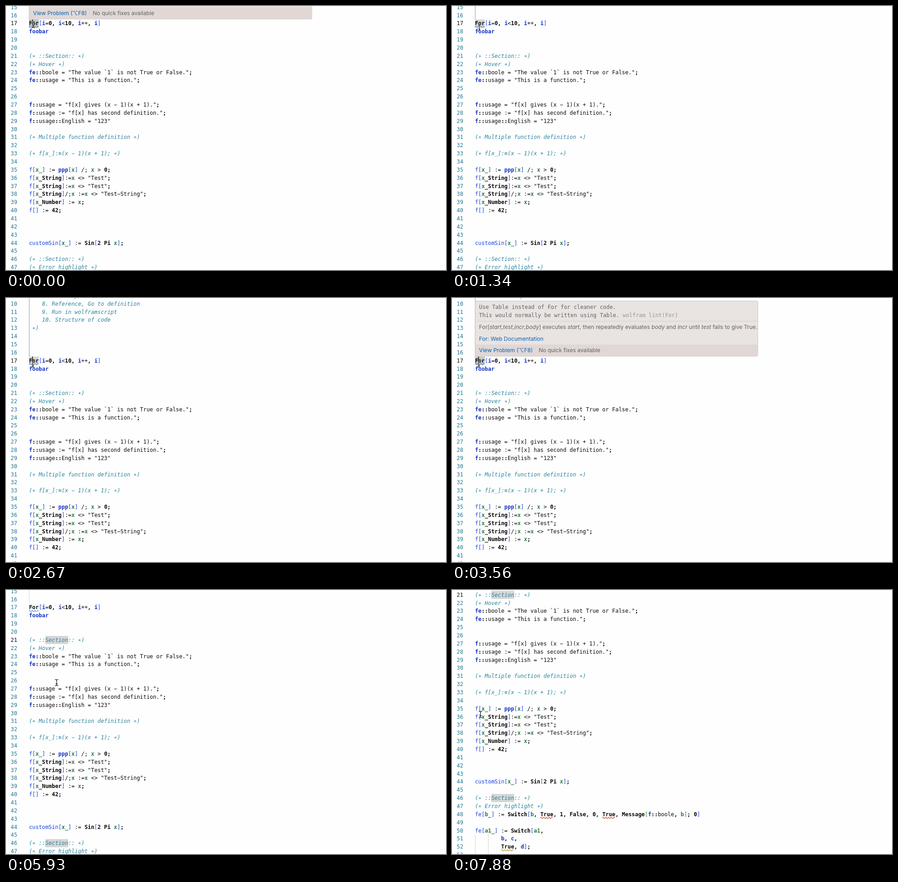
An HTML page that plays this animation: 965x580 px, repeating every 8000 ms.

```html
<!DOCTYPE html>
<html lang="en">
<head>
<meta charset="utf-8">
<title>Editor hover</title>
<style>
html, body { margin: 0; width: 100%; height: 100%; overflow: hidden; background: #fefefe; }
svg { display: block; }
text { white-space: pre; font: 12px "DejaVu Sans Mono", monospace; }
.num { fill: #237893; }
.num.on { fill: #0a0a0a; }
.K, .B, .G, .C { font-weight: bold; }
.K, .k { fill: #0a0a0a; }
.B { fill: #1433c4; }
.b { fill: #1a40e0; }
.G { fill: #277a40; }
.g { fill: #319331; }
.c, .C { fill: #2a84a0; font-style: italic; }
.tip text { fill: #616161; }
.tip .ui { font: 12.2px Inter, "Open Sans", sans-serif; }
.tip .dim { fill: #969696; }
.tip .link { fill: #0b62b0; }
.i { font-style: italic; }
</style>
</head>
<body>
<svg id="stage" width="965" height="580" xmlns="http://www.w3.org/2000/svg">
  <g transform="scale(.992)">
    <g id="page">
      <g id="marks"></g>
      <g id="code"></g>
      <rect id="caret" width="1.8" height="18" fill="#222"/>
      <g id="tip" class="tip" transform="translate(0 -100)">
        <rect x="51.4" y="6.5" width="624.8" height="122.6" rx="2" fill="#e9e4e2" stroke="#c9c6c5"/>
        <rect x="51.9" y="103" width="623.8" height="25.6" fill="#e1d8d6"/>
        <path d="M51.9 51.5h623.8" stroke="#d3cfcd"/>
        <text x="59.8" y="24.4">Use Table instead of For for cleaner code.</text>
        <text x="59.8" y="42.3">This would normally be written using Table. <tspan class="dim">wolfram lint(For)</tspan></text>
        <text class="ui" x="59.8" y="69">For[<tspan class="i">start</tspan>,<tspan class="i">test</tspan>,<tspan class="i">incr</tspan>,<tspan class="i">body</tspan>] executes <tspan class="i">start</tspan>, then repeatedly evaluates <tspan class="i">body</tspan> and <tspan class="i">incr</tspan> until <tspan class="i">test</tspan> fails to give True.</text>
        <text class="ui link i" x="59.8" y="95">For: Web Documentation</text>
        <text class="ui link" x="59.8" y="120">View Problem (⌥F8)</text>
        <text class="ui" x="191.8" y="120">No quick fixes available</text>
      </g>
    </g>
  </g>
  <g id="mouse" fill="none" stroke-linecap="round">
    <path id="halo" stroke="#fff" stroke-width="2.6"/>
    <path id="beam" stroke="#111" stroke-width="1.2"/>
  </g>
</svg>
<script>
const NS = "http://www.w3.org/2000/svg";
const $ = id => document.getElementById(id);
const LOOP = 8000, STEP = 148.4;
const COL = 7.2246, ROW = 18, LEFT = 50.8;
const FIRST = 9;

// Each run starts with its style letter; runs are separated by "|".
const LINES = [
  "c    7. Autocomplete",
  "c    8. Reference, Go to definition",
  "c    9. Run in wolframscript",
  "c    10. Structure of code",
  "c *)",
  "", "", "",
  "KFor|b[|Bi|k=|K0, |Bi|k<|K10, |Bi|k++|K, |Bi|b]",
  "Bfoobar",
  "", "",
  "c(* ::Section:: *)",
  "c(* Hover *)",
  "Bfe|K::|kboole = \"The value `1` is not True or False.\"|K;",
  "Bfe|K::|kusage = \"This is a function.\"|K;",
  "", "",
  "Bf|K::|kusage = \"f[x] gives (x - 1)(x + 1).\"|K;",
  "Bf|K::|kusage := \"f[x] has second definition.\"|K;",
  "Bf|K::|kusage|K::|kEnglish = \"123\"",
  "",
  "c(* Multiple function definition *)",
  "",
  "c(* f[x_]:|C=|c(x - 1)(x + 1); *)",
  "",
  "bf[|Gx_|b]|k := |Bppp|b[|Gx|b]|k /; |Gx|k > |K0;",
  "bf[|Gx|K_String|b]|k:=|Gx|k <> \"Test\"|K;",
  "bf[|Gx|K_String|b]|k:=|Gx|k <> \"Test\"|K;",
  "bf[|Gx|K_String|b]|k/;|Gx|k :=|Gx|k <> \"Test-String\"|K;",
  "bf[|Gx|K_Number|b]|k := |Gx|K;",
  "bf[]|k := |K42;",
  "", "", "",
  "bcustomSin[|Gx_|b]|k := |KSin|b[|K2 Pi |Gx|b]|K;",
  "",
  "c(* ::Section:: *)",
  "c(* Error highlight *)",
  "bfe[|Gb_|b]|k := |KSwitch|b[|Gb|K, True, 1, False, 0, True, Message|g[|Bf|K::|kboole|K, |Gb|g]|K; 0|b]",
  "",
  "bfe[|Ga1_|b]|k := |KSwitch|b[|Ga1|K,",
  "k        |Bb|K, |Bc|K,",
  "k        |KTrue, |Bd|b]|K;",
  ""
];

function add(parent, tag, attrs, text) {
  const el = document.createElementNS(NS, tag);
  for (const k in attrs) el.setAttribute(k, attrs[k]);
  if (text) el.textContent = text;
  return parent.appendChild(el);
}
const rowY = n => 29.7 + (n - 17) * ROW;
const colX = c => LEFT + c * COL;
const glyphs = s => s.replace(/\*/g, "∗").replace(/-/g, "−");

const nums = {};
LINES.forEach((line, i) => {
  const n = FIRST + i, y = rowY(n) + 13.1;
  nums[n] = add($("code"), "text", { class: "num", x: colX(n < 10 ? -4.6 : -5.6), y }, String(n));
  if (!line) return;
  const row = add($("code"), "text", { x: LEFT, y });
  for (const run of line.split("|")) add(row, "tspan", { class: run[0] }, glyphs(run.slice(1)));
});

const box = (n, c, len) => add($("marks"), "rect",
  { x: colX(c), y: rowY(n), width: len * COL, height: ROW, fill: "#d6d6d6" });
const forBox = box(17, 0, 3);
const sections = [box(21, 5, 7), box(46, 5, 7)];

function squiggle(n, c, len, color) {
  let d = `M${colX(c)} ${rowY(n) + 17}`;
  for (let x = 0, up = true; x < len * COL - 2; x += 3, up = !up) d += `q1.5 ${up ? -3 : 3} 3 0`;
  add($("code"), "path", { d, fill: "none", stroke: color, "stroke-width": 1.1 });
}
squiggle(17, 0, 3, "#2f7fd0");
squiggle(48, 20, 4, "#e51400");
squiggle(48, 39, 4, "#e51400");
squiggle(52, 8, 4, "#bf8803");

const guide = (c, a, b) => add($("marks"), "path",
  { d: `M${colX(c) + .6} ${rowY(a)}V${rowY(b)}`, stroke: "#d3d3d3" });
const block = guide(0, 9, 17);
guide(0, 51, 54);
guide(4, 51, 54);

for (const id of ["halo", "beam"])
  $(id).setAttribute("d", "M-3.2 -6.8Q-.4 -6.8 0 -5.2Q.4 -6.8 3.2 -6.8M0 -5.2V5.2M-3.2 6.8Q-.4 6.8 0 5.2Q.4 6.8 3.2 6.8M-1.8 2.6H1.8");

// Keys: [step, value...]
const SCROLL = [[3, 0], [4, -100], [7, -100], [9, 0], [11, 0], [14, 100], [38, 100], [40, 0], [48, 0], [51, -100]];
const MOUSE = [[0, 60, 41], [2, 60, 48.5], [14, 60, 48.5], [18, 59, 145.5], [31, 59, 145.5],
  [35, 111, 203.5], [41, 111, 203.5], [48, 61.5, 230.5], [51, 61.5, 230.5], [53, 62.5, 273.5]];
const CLICK = 36;

function at(keys, k) {
  const j = keys.findIndex(key => key[0] > k);
  if (j === 0) return keys[0].slice(1);
  if (j < 0) return keys[keys.length - 1].slice(1);
  const a = keys[j - 1], b = keys[j], u = (k - a[0]) / (b[0] - a[0]);
  return a.slice(1).map((v, i) => v + (b[i + 1] - v) * u);
}
const show = (el, on) => el.setAttribute("visibility", on ? "visible" : "hidden");

function draw(t) {
  const k = Math.min(53, Math.floor((t + 5) / STEP));
  const clicked = k >= CLICK;
  const hover = k < 4 || (k >= 20 && !clicked);
  $("page").setAttribute("transform", `translate(0 ${at(SCROLL, k)[0]})`);
  $("mouse").setAttribute("transform", `translate(${at(MOUSE, k)})`);
  show($("tip"), hover);
  show(forBox, !clicked);
  forBox.setAttribute("fill", hover ? "#c6c6c6" : "#d6d6d6");
  sections.forEach(s => show(s, k > CLICK));
  block.setAttribute("stroke", clicked ? "#d3d3d3" : "#939393");
  nums[17].classList.toggle("on", !clicked);
  nums[21].classList.toggle("on", clicked);

  const phase = k * STEP - (clicked ? CLICK * STEP : 3505 - 4000);
  show($("caret"), phase % 1000 < 500);
  $("caret").setAttribute("x", colX(clicked ? 8 : 1) - .2);
  $("caret").setAttribute("y", rowY(clicked ? 21 : 17));
}

function tick() {
  draw(performance.now() % LOOP);
  requestAnimationFrame(tick);
}
tick();
</script>
</body>
</html>
```
